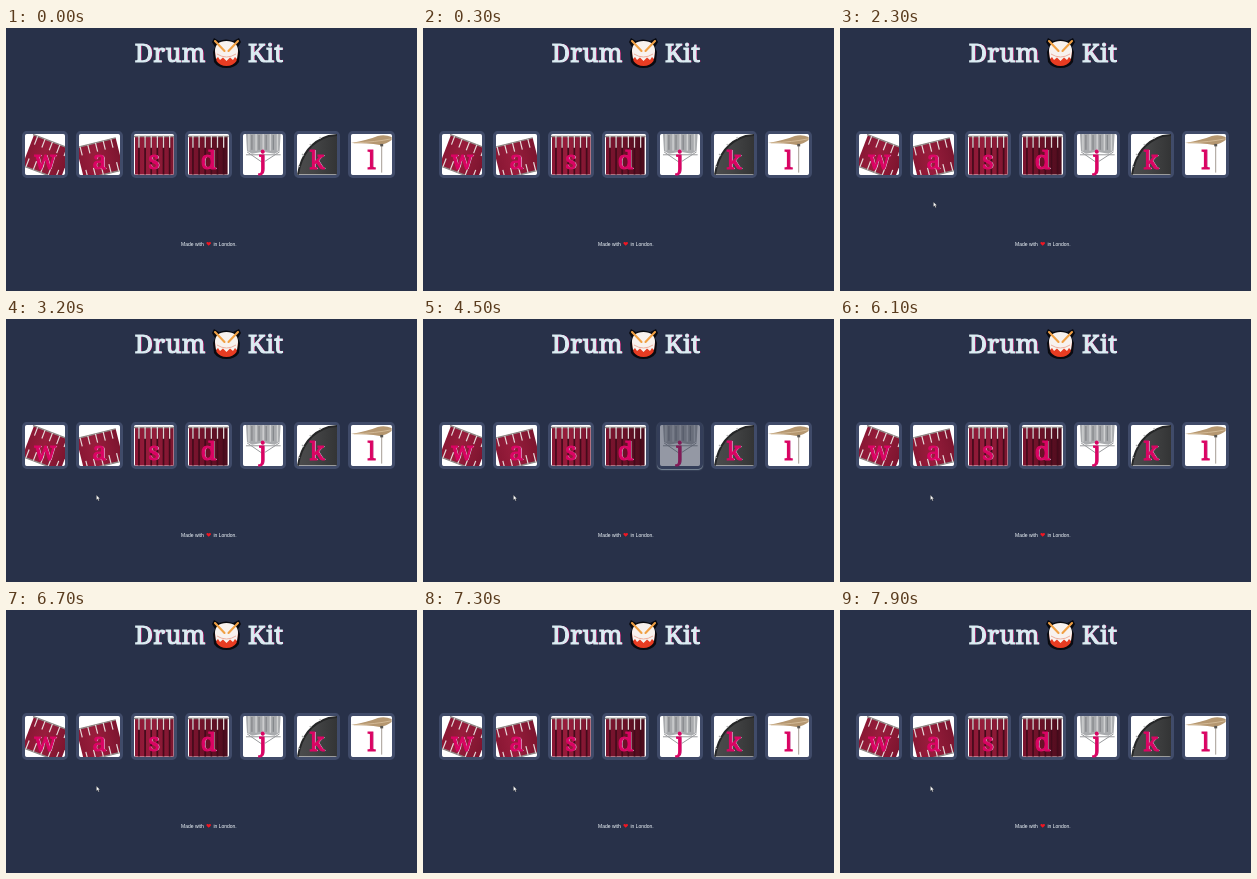
These frames come from a looping animation (411x263 px, 8000 ms). An HTML page:

```html
<!DOCTYPE html>
<html lang="en">
<head>
<meta charset="utf-8">
<title>Drum Kit</title>
<style>
html, body { margin: 0; width: 100%; height: 100%; overflow: hidden; background: #283149; }
#stage { position: relative; width: 411px; height: 263px; overflow: hidden; }
#stage > *, .drum > * { position: absolute; }
.slab { font: 25px/30px "Noto Serif", serif; white-space: nowrap; -webkit-text-stroke: 1.1px; }
.title { top: 9.3px; letter-spacing: .4px; color: #dbedf3; text-shadow: 1px 0 #da0463; }
.drum { top: 103.2px; width: 40.6px; height: 40.6px; border: 3px solid #404b69; border-radius: 4.7px; background: #fff; }
.drum svg { left: 0; top: 0; }
.drum .slab { left: 0; width: 100%; top: 9.7px; text-align: center; color: #da0463; text-shadow: 1px 0 #dbedf3; }
.pressed { opacity: .5; box-shadow: 0 1px 1.25px #dbedf3; }
.foot { top: 213px; font: 5px/6px "Liberation Sans", Arial, sans-serif; color: #f4fbff; white-space: nowrap; }
</style>
</head>
<body>
<div id="stage">
  <span class="slab title" style="left:128.7px">Drum</span>
  <span class="slab title" style="left:242px">Kit</span>
  <svg style="left:205.3px;top:9px" width="31" height="33" viewBox="0 0 31 33">
    <path d="M3 1L8 4Q15 1 22 4L28 1L30 5L27 10L29 15L28 25Q24 31 15.5 31Q7 31 3 25L2 15L4 10L1 5Z" fill="#090a10"/>
    <path d="M4 14L5.5 24Q9 29 15.5 29Q22 29 25.5 24L27 14Z" fill="#e83c22"/>
    <path d="M4 14Q4 4 15.5 4Q27 4 27 14L26 22L24 20L22 23L19 20.5L15.5 24L12 20.5L9 23L7 20L5 22Z" fill="#f8f2ee"/>
    <path d="M6 17Q15.5 23 25 17" fill="none" stroke="#e9a08c" stroke-width=".8"/>
    <path d="M4 4L13.5 14M27 4L17.5 14" stroke="#f0a044" stroke-width="2.1" stroke-linecap="round"/>
  </svg>
  <span class="foot" style="left:175px">Made with</span>
  <svg style="left:200.3px;top:213.4px" width="6" height="6"><path d="M2.7 4.8L.6 2.8C-.2 1.2 1.8 .2 2.7 1.5C3.6 .2 5.6 1.2 4.8 2.8Z" fill="#f01622"/></svg>
  <span class="foot" style="left:207.4px">in London.</span>
  <svg id="cursor" style="left:0;top:0" width="5" height="8"><path d="M.4 .4V5.3L1.6 4.3L2.5 6.2L3.3 5.8L2.5 4H4Z" fill="#fff" stroke="#111" stroke-width=".3"/></svg>
</div>
<script>
const stage = document.getElementById('stage');
const cursor = document.getElementById('cursor');
const line = (d, color, width) => `<path d="${d}" fill="none" stroke="${color}" stroke-width="${width}"/>`;
const lugs = (x, y, step, length, count = 5) => [...Array(count).keys()]
  .map(i => `M${x + i * step} ${y}v${length}`).join('');

// Straight drum shell; the tilted toms are rotated copies.
const shell = fill => `<rect x="1" y="3" width="39" height="38" fill="url(#${fill})"/>` +
  line(lugs(5, 4, 6.2, 37, 6), '#430b1b', 1.7) +
  line('M0 2.5H41', '#8d8583', 1.7) + line(lugs(5, 1, 6.2, 13, 6), '#ded5d4', 1.3);
const tom = (angle, x, y) => `<g transform="translate(${x} ${y}) rotate(${angle})">
  <rect x="-20" y="-16" width="41" height="33" fill="url(#red)"/>` +
  line('M-21 -16H21M-20 17H21', '#8d8583', 1.5) +
  line(lugs(-16, -16, 8, 9) + lugs(-16, 8, 8, 9), '#e6dada', 1.2) + '</g>';

const art = {
  w: tom(21, 22, 23),
  a: tom(-14, 20.5, 24.5),
  s: shell('red'),
  d: shell('dark'),
  j: '<path d="M3 0H38L37 17L32 20L20 18L9 20L4 17Z" fill="#a9abae"/>' +
    line(lugs(6, 0, 7.2, 17), '#d0d1d2', 1.4) + line(lugs(9, 1, 7.2, 15, 4), '#77797d', .9) +
    line('M3 21H38M4 18L20 29L37 18M20 29V40', '#96989b', 1),
  k: '<path d="M1 41Q6 10 32 2L41 1V41Z" fill="url(#grey)"/>' +
    line('M1 41Q6 10 32 2L41 1', '#252627', 2) +
    line('M3 33l-2-1M7 22l-2-2M14 12l-1-2M24 5l-1-2', '#a8a8a8', 1.1),
  l: line('M31 9V39', '#9a9187', .9) +
    '<path d="M0 9Q17 6 27 2Q34 0 41 3V6Q36 10 29 11Q17 9 0 9Z" fill="#b59770"/>' +
    line('M3 9Q26 8 40 5', '#dac3a0', .8) + '<path d="M29.5 10h3v2.5h-3z" fill="#595651"/>'
};

const gradient = (id, a, b, c) => `<linearGradient id="${id}">
  <stop stop-color="${a}"/><stop offset=".4" stop-color="${b}"/><stop offset="1" stop-color="${c}"/></linearGradient>`;
const paints = '<defs>' + gradient('red', '#8a1734', '#981d3c', '#7d152f') +
  gradient('dark', '#7d1430', '#701229', '#4b0c1d') + gradient('grey', '#4b4b4c', '#444546', '#333435') + '</defs>';

const drums = {};
Object.keys(art).forEach((key, i) => {
  const drum = document.createElement('div');
  drum.style.left = 15.9 + i * 54.4 + 'px';
  drum.innerHTML = `<svg width="40.6" height="40.6" viewBox="0 0 41 41">${paints}${art[key]}</svg>
    <span class="slab">${key}</span>`;
  stage.append(drum);
  drums[key] = drum;
});

const HOLD = 100;
const hits = [
  ['w', 2500], ['a', 2700], ['s', 2900], ['d', 3100],
  ['j', 4500], ['k', 4800], ['l', 5000],
  ['a', 5900], ['j', 6200], ['k', 6400], ['l', 6600],
  ['s', 6800], ['d', 7000], ['j', 7200], ['l', 7500], ['k', 7700]
];

function draw(now) {
  const t = now % 8000;
  for (const key in drums) {
    const down = hits.some(([k, at]) => k === key && t >= at && t < at + HOLD);
    drums[key].className = down ? 'drum pressed' : 'drum';
  }
  const p = Math.min(1, Math.max(0, (Math.floor(t / 100) * 100 - 2400) / 800));
  cursor.style.visibility = t < 2300 ? 'hidden' : 'visible';
  cursor.style.transform = `translate(${93 - 3 * p}px, ${173.5 + 2.2 * p}px)`;
  requestAnimationFrame(draw);
}
requestAnimationFrame(draw);
</script>
</body>
</html>
```
